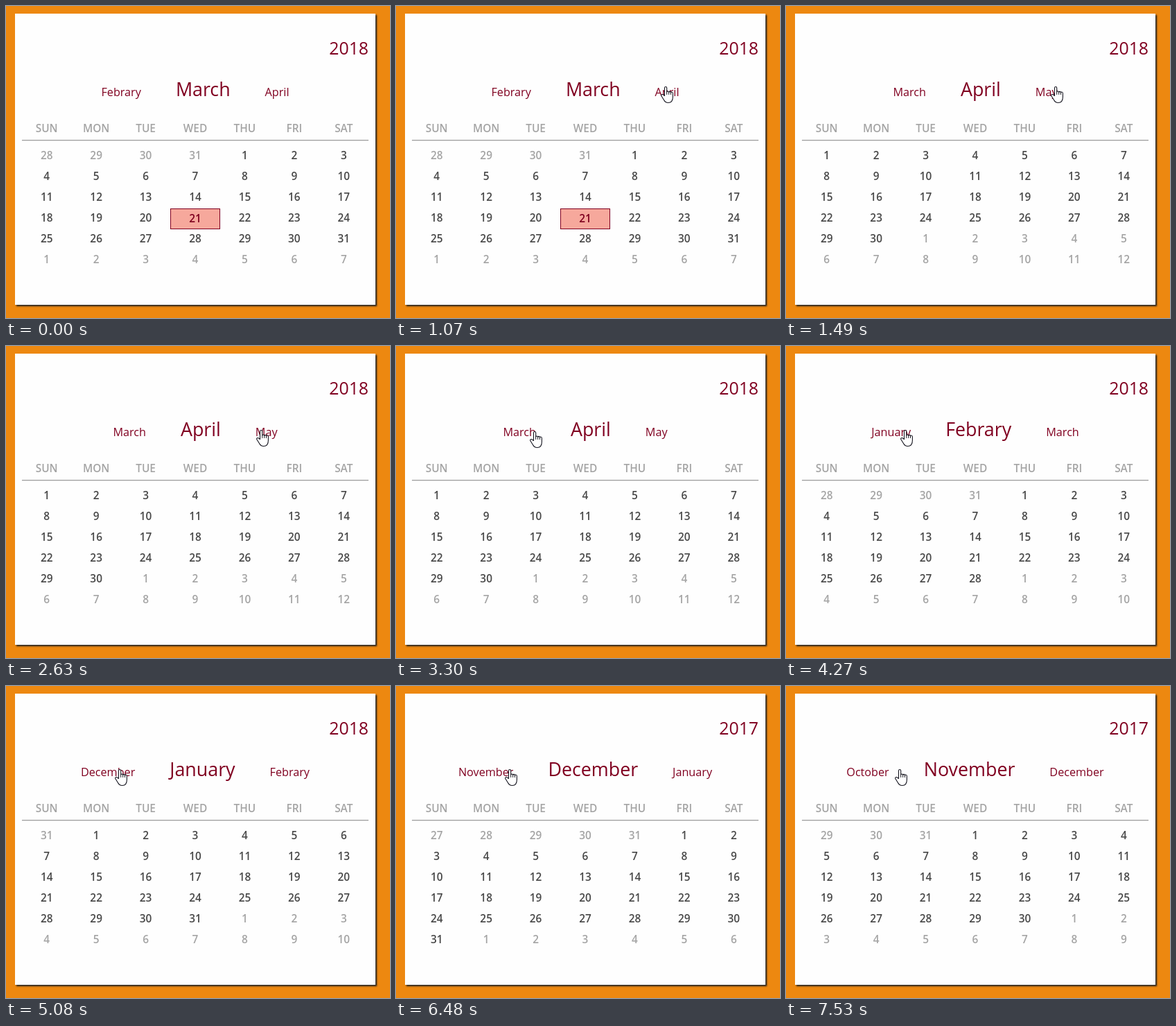
Animation, 554 px wide and 450 px high, one loop 8 s. Source, as an HTML page:

```html
<!DOCTYPE html>
<html lang="en">
<head>
<meta charset="utf-8">
<title>Calendar</title>
<style>
  html, body { margin: 0; width: 100%; height: 100%; overflow: hidden; background: #ed8810; }
  .card {
    position: absolute; left: 13px; top: 11px; width: 520px; height: 420px;
    background: #fefefe; box-shadow: 2px 2px 2px #222;
  }
  svg { position: absolute; left: 0; top: 0; display: block; }
  text { font-family: "Open Sans", "Noto Sans", sans-serif; }
  .link, .month, .year { fill: #800020; }
  .link { font-size: 16.2px; }
  .month { font-size: 26.8px; }
  .year { font-size: 24.8px; text-anchor: end; }
  .head, .day { font-weight: 600; font-size: 15.4px; text-anchor: middle; }
  .head, .day.out { fill: #a4a4a4; }
  .day { fill: #484848; }
  .day.today { fill: #800020; }
</style>
</head>
<body>
<div class="card"></div>
<svg width="554" height="450" viewBox="0 0 554 450">
  <g id="heads"></g>
  <path d="M23 193.5H523" stroke="#9a9a9a"/>
  <path d="M23 194.5H523" stroke="#e6e6e6"/>
  <g id="views"></g>
  <g id="hand" stroke="#14141e" stroke-linecap="round" stroke-linejoin="round" visibility="hidden">
    <path fill="#fff" stroke-width="1.1" d="M5.5 13.5V2.2q0-1.7 1.6-1.7t1.6 1.7V8q.2-1 1.5-1t1.5 1.3q.3-.9 1.4-.9t1.4 1.3q.3-.7 1.3-.7 1.6 0 1.6 2V15q0 8.5-6.7 8.5-4.2 0-6.2-4L1.2 14.3q-1.2-1.6.1-2.5t2.7.5z"/>
    <path fill="none" d="M8.7 8v3.5M11.7 8.3v3.2M14.5 8.7v2.8"/>
  </g>
</svg>
<script>
const LOOP = 8000;
const CENTER = 273, GAP = 50, LEFT = 23, COL = 500 / 7, ROW = 30;
const DAYS = ["SUN", "MON", "TUE", "WED", "THU", "FRI", "SAT"];
const MONTHS = ["January", "Febrary", "March", "April", "May", "June", "July",
  "August", "September", "October", "November", "December"];
const TODAY = new Date(2018, 2, 21);

// one click forward, then clicks back
const NEXT = 1490, BACK = [3580, 4270, 5080, 6480, 7530];

// pointer stops: arrival time, x, y; each is reached in two hard steps
const STEP = 130;
const STOPS = [
  [500, 506, 233], [760, 402, 133], [1070, 382, 116], [1980, 381, 121],
  [2630, 361, 121], [2900, 226, 124], [3300, 193, 123], [3840, 160, 110],
  [3990, 165, 121], [4800, 157, 120]
];

const $ = id => document.getElementById(id);

function add(parent, tag, attrs, text) {
  const el = document.createElementNS("http://www.w3.org/2000/svg", tag);
  for (const key in attrs) el.setAttribute(key, attrs[key]);
  if (text !== undefined) el.textContent = text;
  return parent.appendChild(el);
}

const colX = col => LEFT + COL * (col + 0.5);

function addTitle(g, month) {
  const items = [-1, 0, 1].map(shift =>
    add(g, "text", { class: shift ? "link" : "month", y: 130 }, MONTHS[(month + shift + 12) % 12]));
  const widths = items.map(el => el.getComputedTextLength());
  let x = CENTER - (widths[0] + widths[1] + widths[2]) / 2 - GAP;
  items.forEach((el, i) => {
    el.setAttribute("x", x);
    x += widths[i] + GAP;
  });
}

function addDays(g, year, month) {
  const first = new Date(year, month, 1).getDay();
  const length = new Date(year, month + 1, 0).getDate();
  for (let i = 0; i < 42; i++) {
    const n = i - first + 1;
    const out = n < 1 || n > length;
    // leading days always count back from 31
    const label = n < 1 ? 31 + n : n > length ? n - length : n;
    const today = +new Date(year, month, n) === +TODAY;
    const y = 221 + Math.floor(i / 7) * ROW;
    if (today) {
      add(g, "rect", { x: 237.5, y: y - 18.5, width: 71, height: 29,
        fill: "#f6a89c", stroke: "#800020" });
    }
    add(g, "text", {
      class: "day" + (out ? " out" : today ? " today" : ""),
      x: colX(i % 7), y: today ? y + 1 : y
    }, label);
  }
}

function addPage(shift) {
  const date = new Date(2018, 2 + shift, 1);
  const year = date.getFullYear(), month = date.getMonth();
  const g = add($("views"), "g", { visibility: "hidden" });
  add(g, "text", { class: "year", x: 523, y: 70 }, year);
  addTitle(g, month);
  addDays(g, year, month);
  return { shift, g };
}

DAYS.forEach((name, i) => add($("heads"), "text", { class: "head", x: colX(i), y: 182 }, name));
const pages = [1, 0, -1, -2, -3, -4].map(addPage);

const shiftAt = t => (t >= NEXT) - BACK.filter(click => click <= t).length;

function pointerAt(t) {
  const i = STOPS.filter(stop => stop[0] <= t).length - 1;
  if (i < 0) return null;
  const [, x, y] = STOPS[i];
  const next = STOPS[i + 1];
  if (!next || t < next[0] - STEP) return [x, y];
  return [(x + next[1]) / 2, (y + next[2]) / 2];
}

function show(el, on) {
  el.setAttribute("visibility", on ? "visible" : "hidden");
}

function draw(t) {
  const shift = shiftAt(t);
  pages.forEach(page => show(page.g, page.shift === shift));
  const point = pointerAt(t);
  show($("hand"), point);
  if (point) $("hand").setAttribute("transform", `translate(${point})`);
}

const start = performance.now();
function tick() {
  draw((performance.now() - start) % LOOP);
  requestAnimationFrame(tick);
}
tick();
</script>
</body>
</html>
```
